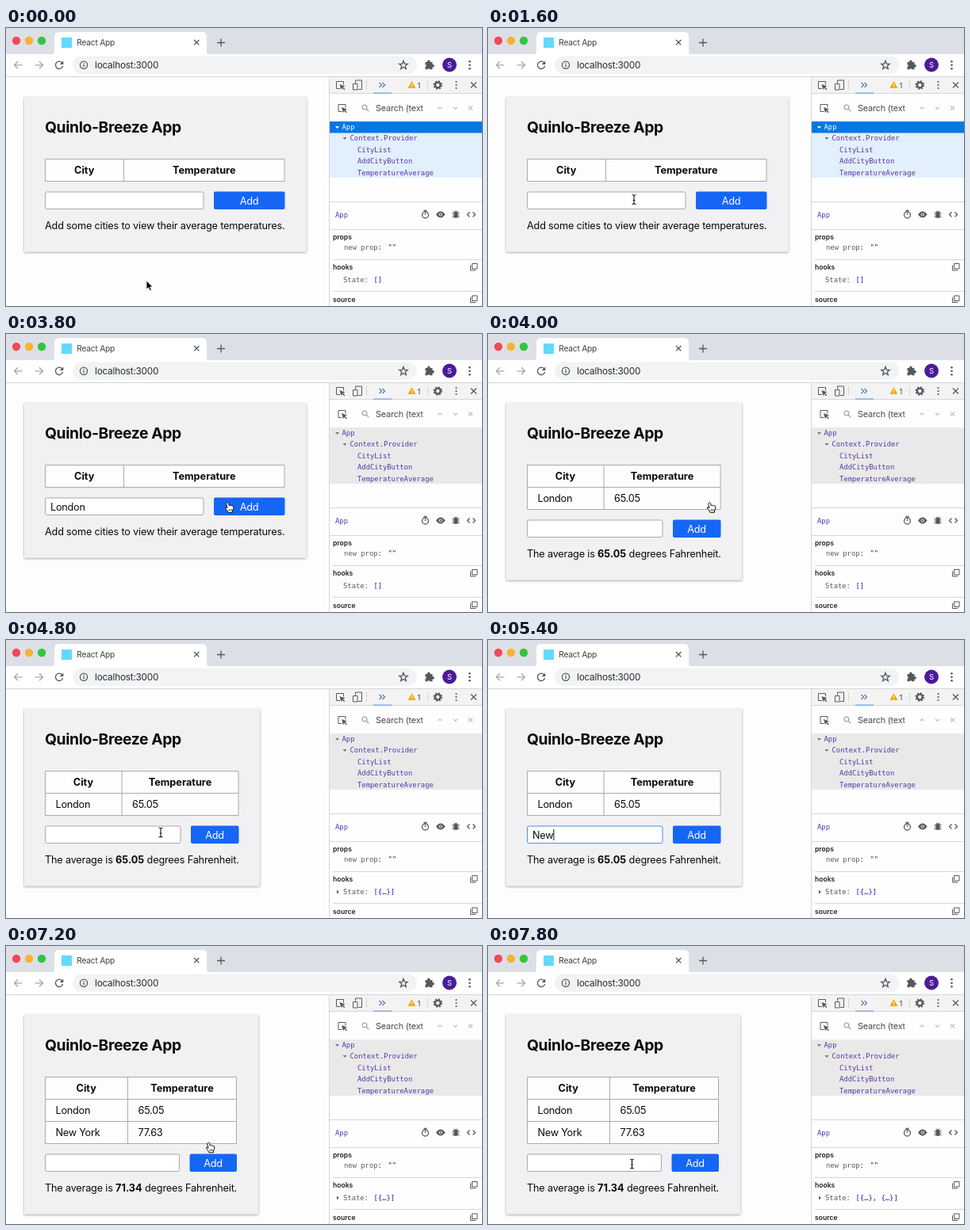
These frames come from a looping animation (600x351 px, 8000 ms). An HTML page:

```html
<!DOCTYPE html>
<html lang="en">
<head>
<meta charset="utf-8">
<title>Weather demo</title>
<style>
html, body { margin: 0; width: 100%; height: 100%; overflow: hidden; background: #fff; }
svg { display: block; width: 100vw; height: 100vh; }
text { font: 12.7px Inter, "Open Sans", sans-serif; letter-spacing: -.019em; fill: #0b0b0b; white-space: pre; }
.note { letter-spacing: -.0147em; }
.b { font-weight: 700; letter-spacing: 0; }
.title { font-size: 19.3px; font-weight: 700; letter-spacing: -.02em; }
.mono text, text.mono { font: 8.86px "DejaVu Sans Mono", "Noto Sans Mono", monospace; letter-spacing: 0; }
.comp { fill: #5637a8; }
.val { fill: #2018a8; }
.key { fill: #5c5c5c; }
.sec { font-size: 8.6px; font-weight: 600; letter-spacing: 0; fill: #222; }
.i { fill: none; stroke: #55595e; stroke-width: 1.3; }
.thin { stroke-width: 1; }
.pale { stroke: #a5a8ac; }
.faint { stroke: #c2c4c7; }
.ln { fill: none; stroke: #d6d6d6; }
.dot { fill: #55595e; }
</style>
</head>
<body>
<svg viewBox="0 0 600 351" xmlns="http://www.w3.org/2000/svg">
  <defs>
    <filter id="shade" x="-10%" y="-10%" width="120%" height="120%">
      <feDropShadow dx="0" dy="1" stdDeviation="1.4" flood-color="#000" flood-opacity=".38"/>
    </filter>
    <clipPath id="searchClip"><rect x="460" y="90" width="65.5" height="24"/></clipPath>
  </defs>
  <rect width="600" height="351" fill="#fdfdfd"/>

  <!-- tab strip -->
  <rect width="600" height="35" fill="#dce0e6"/>
  <circle cx="13" cy="16" r="5.2" fill="#f4475a"/>
  <circle cx="29" cy="16" r="5.2" fill="#f5b433"/>
  <circle cx="45" cy="16" r="5.2" fill="#32c544"/>
  <path d="M55 35q6 0 6-6V11q0-6 6-6h180q6 0 6 6v18q0 6 6 6z" fill="#fff"/>
  <rect x="70" y="12" width="13" height="13" fill="#61dafb"/>
  <text x="89.2" y="22" style="font-size:10.2px;fill:#3c4043">React App</text>
  <path class="i" d="M237 15l6.400 6.400M243.400 15l-6.400 6.400M271 13.500v10M266 18.500h10"/>

  <!-- toolbar -->
  <rect y="33" width="600" height="28.500" fill="#fff"/>
  <rect x="84" y="35.500" width="434" height="22.500" rx="11.250" fill="#f1f3f4"/>
  <path class="ln" d="M0 61.500H600"/>
  <path class="i pale" d="M20.500 46.800h-10M15 42.300l-4.500 4.500 4.500 4.500M36.500 46.800h10M42 42.300l4.500 4.500-4.500 4.500"/>
  <path class="i" d="M70.500 43.500a4.700 4.700 0 1 0 1.200 4.400"/>
  <path class="dot" d="M72.300 41.500v4.600h-4.600z"/>
  <circle class="i" cx="98" cy="46.800" r="4.600"/>
  <path class="i" d="M98 46v3.300M98 44v1.200"/>
  <text x="112" y="51.200" style="font-size:11.800px;fill:#2a2d31">localhost:3000</text>
  <path id="star" class="i"/>
  <path class="dot" d="M528.500 43h2.700a1.800 1.800 0 1 1 3.400 0h2.900v3a1.800 1.800 0 1 1 0 3.400v2.900h-3a1.700 1.700 0 0 0-3.200 0h-2.800v-3.200a1.600 1.600 0 0 0 0-3.100z"/>
  <circle cx="559" cy="46.500" r="9" fill="#4a1c98"/>
  <text x="559" y="50" text-anchor="middle" style="font-size:9.500px;fill:#fff">S</text>
  <g class="dot"><circle cx="584.500" cy="42.300" r="1.300"/><circle cx="584.500" cy="46.800" r="1.300"/><circle cx="584.500" cy="51.300" r="1.300"/></g>

  <g id="page"></g>

  <!-- inspector panel -->
  <rect x="407" y="62" width="193" height="289" fill="#fefefe"/>
  <rect x="407" y="62" width="193" height="20" fill="#f3f3f3"/>
  <path class="ln" d="M407 82.500h193M407.500 62V351M408 219.500h192M408 254.500h192M412 292.500h188M412 332.500h188M454.500 66v12M531.500 66v12"/>
  <path class="i thin" d="M421 76.500h-4.500v-9h9v4M440.500 69.500v-3.500h8v11.500h-4.500M437.500 70.500h5.500v7.500h-5.500z"/>
  <path id="pick" class="dot" d="M420.500 71l7 2.600-2.700 1.200 2.500 2.500-1 1-2.500-2.500-1.200 2.500z"/>
  <path class="i" style="stroke:#5a7db5" d="M470.500 69l3 3-3 3M474.500 69l3 3-3 3"/>
  <rect x="463" y="81.500" width="23" height="1.200" fill="#6ea0ea"/>
  <path d="M511.500 67l5 9h-10z" fill="#f2a90c"/>
  <path d="M511.500 70v3M511.500 74v1" stroke="#fff"/>
  <text x="518.500" y="75.700" style="font-size:9.500px;fill:#444">1</text>
  <circle class="i" cx="544.300" cy="72" r="3.400" style="stroke-width:2.400"/>
  <circle class="i" cx="544.300" cy="72" r="5" style="stroke-width:1.600;stroke-dasharray:2 1.930"/>
  <g class="dot"><circle cx="567.500" cy="68" r="1.100"/><circle cx="567.500" cy="72" r="1.100"/><circle cx="567.500" cy="76" r="1.100"/></g>
  <path class="i" d="M586 68.500l7 7M593 68.500l-7 7"/>

  <path class="i thin" d="M423.500 105.500H419v-9h9v4"/>
  <use href="#pick" x="2.500" y="29"/>
  <circle class="i pale" cx="452" cy="100" r="2.900"/>
  <path class="i pale" d="M454 102l3.300 3.300"/>
  <path class="i faint" d="M544.500 102.300l2.500-2.500 2.500 2.500M564 99.800l2.500 2.500 2.500-2.500M583 98.500l5 5M588 98.500l-5 5"/>
  <text x="466" y="104.800" clip-path="url(#searchClip)" style="font-size:10.900px;fill:#4a4a4a">Search (text or /regex/)</text>

  <g id="tree" class="mono"></g>

  <text class="mono comp" x="415" y="239">App</text>
  <circle class="i" cx="528.500" cy="236" r="4"/>
  <path class="i" d="M528.500 236v-2.500M526.500 230.500h4"/>
  <path class="dot" d="M542 235.500q5.800-8 11.600 0q-5.800 8-11.600 0z"/>
  <circle cx="547.800" cy="235.500" r="2.100" fill="#fff"/><circle class="dot" cx="547.800" cy="235.500" r="1.200"/>
  <rect class="dot" x="564.500" y="231.500" width="5" height="8.500" rx="2.500"/>
  <path class="i thin" d="M562.500 233.500h9M562.500 236h9M562.500 238.500h9M565 230.500l1.500 1.500M569 230.500l-1.500 1.500"/>
  <path class="i" d="M584.500 232.500l-3 3 3 3M588.500 232.500l3 3-3 3"/>
  <text class="sec" x="412" y="267">props</text>
  <text class="sec" x="412" y="305">hooks</text>
  <text class="sec" x="412" y="346">source</text>
  <g id="copy"><path class="i thin" d="M587.500 297.500h6.500v6.500h-6.500zM585.500 299.500v6.500h6.500"/></g>
  <use href="#copy" y="40.500"/>
  <text class="mono key" x="426" y="280">new prop<tspan fill="#333">:</tspan> <tspan class="val" x="481.500">""</tspan></text>
  <g id="hook" class="mono"></g>
  <g id="mouse"></g>
</svg>
<script>
const LOOP = 8000, STEP = 200;
const $ = id => document.getElementById(id);
const rect = (x, y, w, h, more) => `<rect x="${x}" y="${y}" width="${w}" height="${h}" ${more}/>`;
const text = (x, y, s, more = '') => `<text x="${x}" y="${y}" ${more}>${s}</text>`;

// page layout by number of cities listed
const LAYOUTS = [
  { card: 378.5, right: 351, col: 148.5, input: 249, btn: 262, note: 'Add some cities to view their average temperatures.' },
  { card: 320, right: 293, col: 146, input: 220, btn: 233, avg: '65.05' },
  { card: 318, right: 290.5, col: 153.5, input: 218.5, btn: 231.5, avg: '71.34' }
];
const CITIES = [['London', '65.05'], ['New York', '77.63']];

// [time, value]: each value holds until the next
const ROWS = [[0, 0], [4000, 1], [7200, 2]];
const STATE = [[0, '[]'], [4400, '[{…}]'], [7600, '[{…}, {…}]']];
const FOCUS = [[0, 0], [1800, 1], [3800, 0], [5000, 1], [7000, 0]];
const TYPED = [[0, ''], [2000, 'L'], [2200, 'Lo'], [2400, 'Lon'], [2600, 'Lond'], [2800, 'Londo'], [3000, 'London'],
  [4000, ''], [5200, 'Ne'], [5400, 'New'], [5600, 'New Y'], [5800, 'New Yo'], [6000, 'New York'], [7200, '']];
const SHAPE = [[0, 'arrow'], [1200, 'beam'], [2000, ''], [3200, 'beam'], [3600, 'hand'], [4400, 'arrow'],
  [4600, 'beam'], [5200, ''], [6400, 'beam'], [6800, 'hand'], [7400, 'arrow'], [7600, 'beam']];

// [time, x, y]: pointer path with eased legs
const PATH = [[0, 177, 319], [600, 177, 319], [1500, 184, 216.5], [3200, 184, 216.5], [3800, 281, 219],
  [4200, 281, 219], [4800, 195, 243], [6200, 204, 242.5], [6400, 204, 242.5], [7000, 257, 253],
  [7400, 257, 256], [7800, 181.5, 275], [8000, 181.5, 275]];

const SHAPES = {
  arrow: '<path d="M0 0v11l2.600-2.300 1.800 4 1.900-.8-1.700-3.900h3.500z" fill="#000" stroke="#fff" stroke-width=".8"/>',
  beam: '<path d="M-2.500-6q2 0 2.500 1.200Q.5-6 2.500-6M0-5V5M-2.500 6q2 0 2.500-1.200Q.5 6 2.500 6M-1.300 1h2.600" fill="none" stroke="#111" stroke-width="1.100"/>',
  hand: '<path d="M-2.500-6q1.500-.8 2 .6l.7 3q1.200-1 2 .1 1.200-.8 1.900.4 1.600-.5 1.700 1.400.1 3-1.300 4.500v2.300h-5.600q-.8-2.200-3.500-5.300-.4-1.700 1.600-1.100l1 .9-1.300-5.300q0-1 .8-1.500z" fill="#fff" stroke="#111"/><path d="M0 2v2.500M1.700 2v2.500M3.400 2v2.500" stroke="#111" stroke-width=".7"/>'
};

const at = (list, t) => list.filter(e => e[0] <= t).pop()[1];

function pointer(t) {
  const n = Math.max(1, PATH.findIndex(p => p[0] > t));
  const [a, x, y] = PATH[n - 1], [b, u, v] = PATH[n];
  const k = (t - a) / (b - a), e = k * k * (3 - 2 * k);
  return [x + (u - x) * e, y + (v - y) * e];
}

function drawPage(rows, typed, focus) {
  const L = LAYOUTS[rows], d = 28 * rows, bottom = 193.5 + d, top = 207 + d;
  let lines = `M49.500 165.500H${L.right}V${bottom}H49.500zM${L.col} 165.500V${bottom}`;
  let s = rect(23, 87, L.card - 23, 195.5 + d, 'fill="#f1f0f2" filter="url(#shade)"');
  s += text(49, 132, 'Quinlo-Breeze App', 'class="title"');
  s += rect(49.5, 165.5, L.right - 49.5, 28 + d, 'fill="#fdfdfd"');
  s += text((49 + L.col) / 2, 184, 'City', 'class="b" text-anchor="middle"');
  s += text((L.col + L.right) / 2, 184, 'Temperature', 'class="b" text-anchor="middle"');
  CITIES.slice(0, rows).forEach(([city, temp], i) => {
    const y = 193.5 + 28 * i;
    lines += `M49.500 ${y}H${L.right}`;
    s += text(62.5, y + 18.5, city) + text(L.col + 13, y + 18.5, temp);
  });
  s += `<path d="${lines}" fill="none" stroke="#ababab"/>`;
  s += rect(49.5, top, L.input - 49.5, 21.5, `rx="2" fill="#fff" stroke="${focus ? '#4590ee' : '#a8a8a8'}"`);
  s += text(56, top + 15.5, typed, 'id="typed"');
  s += rect(L.btn, top - .5, L.right - L.btn + .5, 22.5, 'rx="2" fill="#1666f5"');
  s += text((L.btn + L.right) / 2, top + 15.5, 'Add', 'text-anchor="middle" style="fill:#fff"');
  s += text(49, 254 + d, L.note || `The average is <tspan class="b">${L.avg}</tspan> degrees Fahrenheit.`, 'class="note"');
  $('page').innerHTML = s;
  if (focus) {
    const x = 56 + (typed ? $('typed').getComputedTextLength() : 0);
    $('page').innerHTML += rect(x, top + 4, 1, 14, 'fill="#111"');
  }
}

function drawTree(dim) {
  const arrow = (x, y, c) => `<path d="M${x} ${y}h5l-2.500 3z" fill="${c}"/>`;
  let s = rect(408, 118, 192, 71, `fill="${dim ? '#e9e9e9' : '#e2effc'}"`);
  if (!dim) s += rect(408, 118, 192, 14.5, 'fill="#0678e3"');
  s += arrow(415, 124, dim ? '#777' : '#fff') + arrow(424.5, 138, '#777');
  s += text(423.5, 128.3, 'App', dim ? 'class="comp"' : 'style="fill:#fff"');
  [[433.5, 'Context.Provider'], [443, 'CityList'], [443, 'AddCityButton'], [443, 'TemperatureAverage']]
    .forEach(([x, name], i) => s += text(x, 142.3 + 14.5 * i, name, 'class="comp"'));
  $('tree').innerHTML = s;
}

function drawHook(value) {
  const open = value === '[]' ? '' : '<path d="M417 315.500v5l3-2.500z" fill="#666"/>';
  $('hook').innerHTML = open + text(425, 321, 'State:', 'class="key"') + text(463.5, 321, value, 'class="val"');
}

let last = -1;
function render(t) {
  if (t === last) return;
  last = t;
  drawPage(at(ROWS, t), at(TYPED, t), at(FOCUS, t));
  drawTree(t >= 1800);
  drawHook(at(STATE, t));
  const shape = at(SHAPE, t), [x, y] = pointer(t);
  $('mouse').innerHTML = shape ? `<g transform="translate(${x} ${y})">${SHAPES[shape]}</g>` : '';
}

$('star').setAttribute('d', 'M' + Array.from({ length: 10 }, (_, i) => {
  const r = i % 2 ? 2.4 : 5.6, a = i * Math.PI / 5;
  return `${501 + r * Math.sin(a)} ${47 - r * Math.cos(a)}`;
}).join('L') + 'z');

const start = performance.now();
function tick() {
  const t = (performance.now() - start) % LOOP;
  render(Math.floor(t / STEP) * STEP);
  requestAnimationFrame(tick);
}
tick();
</script>
</body>
</html>
```
